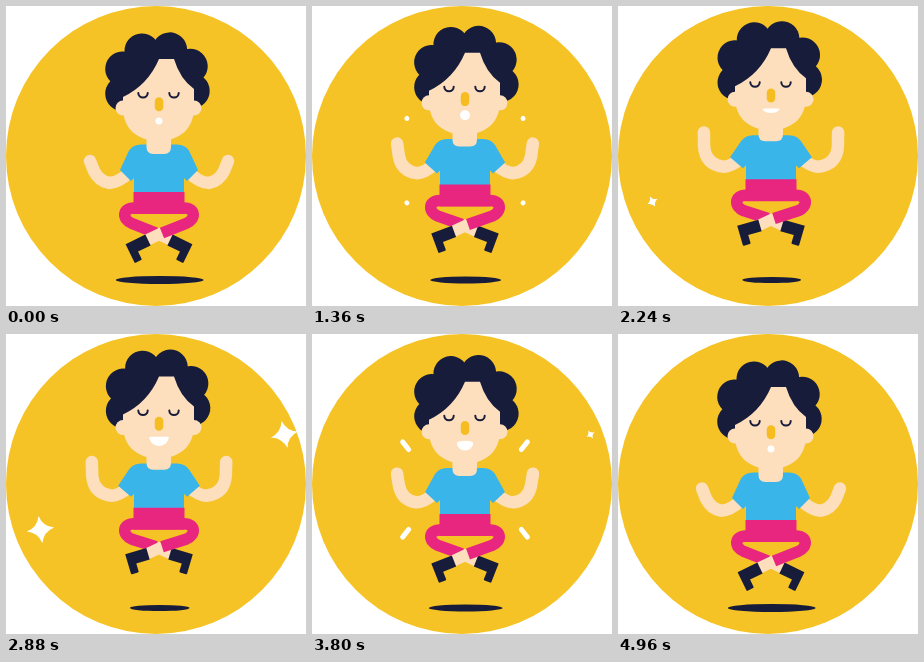
An HTML page with a canvas for the animation above (5 s loop, 300 px wide and 300 px high).

```html
<!DOCTYPE html>
<html lang="en">
<head>
<meta charset="utf-8">
<title>Meditation</title>
<style>
  html, body { margin: 0; width: 100%; height: 100%; overflow: hidden; background: #fff; }
  canvas { display: block; width: 300px; height: 300px; }
</style>
</head>
<body>
<canvas id="stage"></canvas>
<script>
const LOOP = 5000, TAU = 2 * Math.PI, DEG = Math.PI / 180;
const YELLOW = '#f5c326', NAVY = '#171c3b', PINK = '#e9267f', BLUE = '#3ab5ea',
      SKIN = '#fddfbe', NOSE = '#f6bd23', WHITE = '#fff';

const canvas = document.getElementById('stage');
const ctx = canvas.getContext('2d');
const dpr = window.devicePixelRatio || 1;
canvas.width = canvas.height = 300 * dpr;

const mix = (a, b, k) => a + (b - a) * k;
const ramp = (t, start, end) => Math.min(1, Math.max(0, (t - start) / (end - start)));
const ease = (t, start, end) => (1 - Math.cos(Math.PI * ramp(t, start, end))) / 2;

function fill(path, color) {
  ctx.fillStyle = color;
  ctx.fill(new Path2D(path));
}

function stroke(path, color, width, cap = 'round') {
  ctx.strokeStyle = color;
  ctx.lineWidth = width;
  ctx.lineCap = cap;
  ctx.lineJoin = 'round';
  ctx.stroke(new Path2D(path));
}

function ellipse(x, y, rx, ry, color) {
  ctx.fillStyle = color;
  ctx.beginPath();
  ctx.ellipse(x, y, rx, ry, 0, 0, TAU);
  ctx.fill();
}

function shifted(dx, dy, draw) {
  ctx.save();
  ctx.translate(dx, dy);
  draw();
  ctx.restore();
}

// Draws the mirrored half first, then the left half
function bothSides(draw) {
  ctx.save();
  ctx.translate(306, 0);
  ctx.scale(-1, 1);
  draw();
  ctx.restore();
  draw();
}

// Swells, straightens and shrinks again between start and end
function star(t, x, y, size, start, end) {
  const pulse = Math.sin(Math.PI * ramp(t, start, end));
  const r = size * pulse, c = r * 0.2;
  shifted(x, y, () => {
    ctx.rotate(-0.13 - 0.6 * (1 - pulse));
    fill(`M0 ${-r}Q${c} ${-c} ${r} 0Q${c} ${c} 0 ${r}Q${-c} ${c} ${-r} 0Q${-c} ${-c} 0 ${-r}`, WHITE);
  });
}

// Rays shoot out, shorten to dots and fade; the second half runs backwards
function rays(u, lift) {
  if (u < 560) return;
  const settle = ramp(u, 800, 1360);
  const tail = 0.29 * settle;
  const tip = ramp(u, 600, 800) - 0.71 * settle + 0.001;
  const cy = 159.5 - 8.5 * lift;
  const point = (k, side) => `${101 - 21 * k} ${cy + side * (34.5 + 26.5 * k)}`;
  ctx.globalAlpha = 1 - ramp(u, 1400, 1800);
  bothSides(() => {
    for (const side of [-1, 1])
      stroke(`M${point(tail, side)}L${point(tip, side)}`, WHITE, 5);
  });
  ctx.globalAlpha = 1;
}

function arm(raise) {
  const m = (a, b) => mix(a, b, raise);
  const elbow = m(177, 160);
  stroke(`M${m(84, 86)} ${m(155, 125)}L${m(88, 86)} ${m(165, 139)}
    Q${m(93, 87)} ${elbow - 2} ${m(103, 106)} ${elbow}
    Q${m(112, 113)} ${elbow} 124 ${m(166, 151)}`, SKIN, 12.5);
}

function leg(lift) {
  const ankle = mix(48, 46, lift);
  stroke(`M156 ${ankle - 7}L140 ${ankle + 0.5}`, SKIN, 11.5, 'butt');
  stroke(`M153 16H178C190 16 190 27.5 180 31.5L156 ${ankle - 7}`, PINK, 11.5, 'butt');
  shifted(142, ankle, () => {
    ctx.rotate(-mix(26, 16, lift) * DEG);
    fill('M0 -6H-22V14Q-22 15 -21 15H-15Q-14 15 -14 14V6H0Z', NAVY);
  });
}

function body(lift) {
  const top = mix(-47.5, -44, lift);
  bothSides(() => fill(`M154 ${top}H135Q127 ${top} 123 ${top + 6}L${mix(114, 112, lift)} -22
    L125 -11L128 -14V1H154Z`, BLUE));
  fill('M140.5 -66V-45Q140.5 -38 147.5 -38H158Q165 -38 165 -45V-66Z', SKIN);
  bothSides(() => leg(lift));
  fill('M127.5 0H178.5V22H127.5Z', PINK);
}

function hair(t, lift) {
  const sway = -1.5 * Math.cos(2 * TAU * t / LOOP);
  shifted(152.5 + sway, 75 - 11.5 * lift, () => {
    ctx.rotate(-0.04);
    ellipse(0, 0, 40, 40, NAVY);
    for (let i = 0; i < 6; i++) {
      const a = (20 - 44 * i) * DEG;
      ellipse(37 * Math.cos(a), 33 * Math.sin(a), 17.5, 17.5, NAVY);
    }
  });
}

// A small "o" that turns into a smile, then a grin, and back
function mouth(t, lift) {
  const o = 3.5 + 2.6 * lift;
  const smile = ease(t, 1500, 2240) - ease(t, 3400, 4400);
  const grin = ease(t, 2240, 3300) - ease(t, 3400, 4200);
  const w = mix(o, 8.5, smile) + 2 * grin;
  const up = mix(o, 0.3, smile);
  const down = mix(o, 4.2, smile) + 7 * grin;
  const y = 115 - 10 * lift - 2.5 * smile;
  fill(`M${153 - w} ${y}A${w} ${up} 0 0 1 ${153 + w} ${y}A${w} ${down} 0 0 1 ${153 - w} ${y}Z`, WHITE);
}

function head(t, lift) {
  hair(t, lift);
  shifted(0, -9 * lift, () => {
    ellipse(117, 102, 7.5, 7.5, SKIN);
    ellipse(188, 102, 7.5, 7.5, SKIN);
  });
  shifted(0, -11 * lift, () => {
    fill('M153 53Q142 79 117 91V102C117 123 132 135 152.5 135S188 123 188 102V83Q174 73 168 53Z', SKIN);
    for (const x of [137, 168])
      stroke(`M${x - 4.7} 87A4.7 4.5 0 0 0 ${x + 4.7} 87`, NAVY, 2);
  });
  shifted(0, -9 * lift, () => stroke('M153 95.5V101', NOSE, 8.5));
  mouth(t, lift);
}

function draw(t) {
  const lift = (1 - Math.cos(TAU * t / LOOP)) / 2;
  const mirrored = Math.min(t, LOOP - t);
  ctx.setTransform(dpr, 0, 0, dpr, 0, 0);
  ctx.fillStyle = WHITE;
  ctx.fillRect(0, 0, 300, 300);
  ellipse(150, 150, 150, 150, YELLOW);
  ellipse(153.7, 274, 44 - 15 * lift, 4 - lift, NAVY);

  star(t, 44, 95, 10.3, 400, 900);
  star(t, 34.5, 195.5, 14, 2040, 3530);
  star(t, 278.5, 100.5, 16, 2350, 3950);
  star(t, 275, 219, 9, 4180, 4850);
  rays(mirrored, lift);

  bothSides(() => arm(ramp(mirrored, 0, 2350)));
  shifted(0, 186 - 13 * lift, () => body(lift));
  head(t, lift);
}

function tick() {
  draw(performance.now() % LOOP);
  requestAnimationFrame(tick);
}
tick();
</script>
</body>
</html>
```
